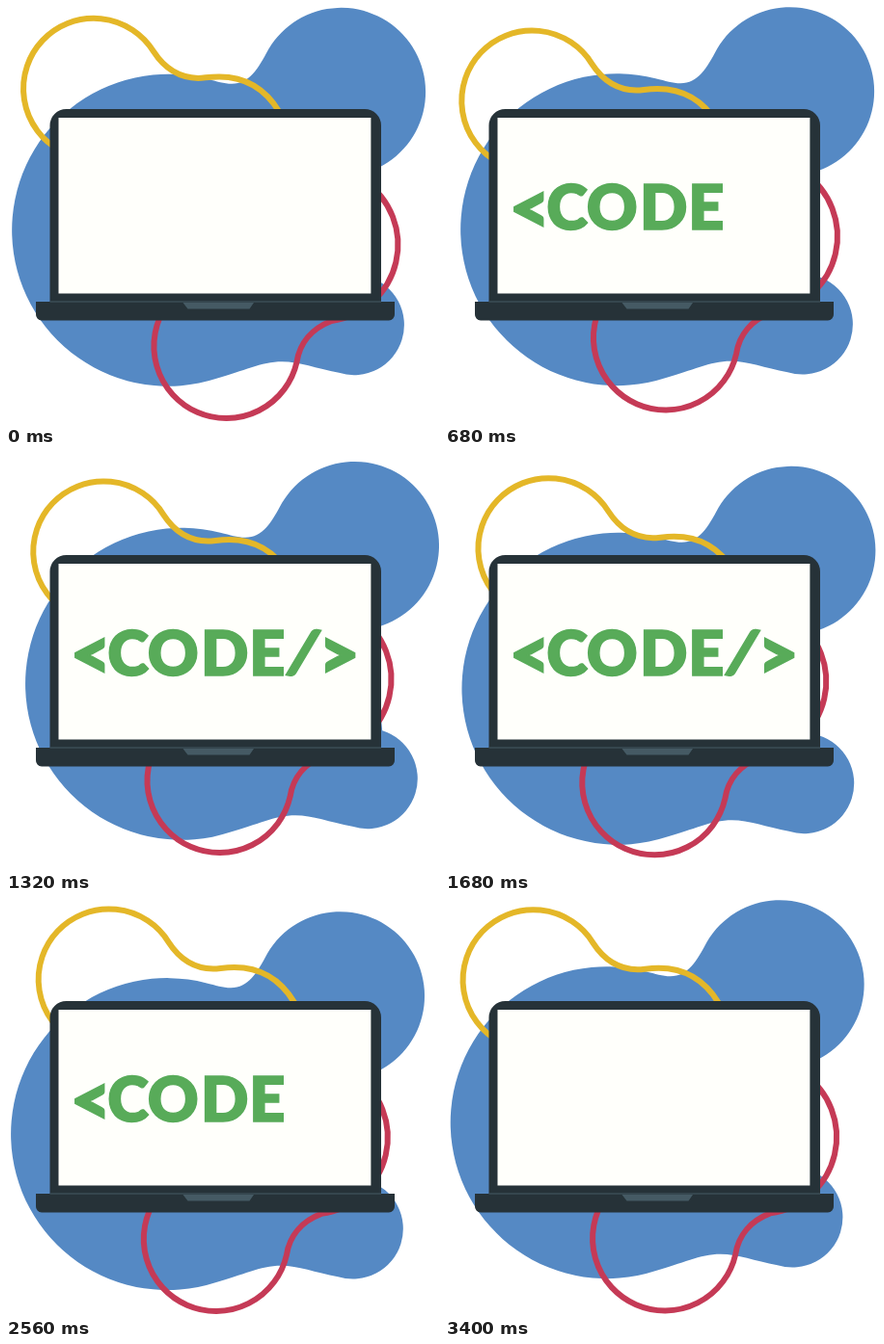
Write an HTML page that moves like this. It is 449 by 434 pixels and loops after 3.44 s.

```html
<!DOCTYPE html>
<html lang="en">
<head>
<meta charset="utf-8">
<title>Code laptop</title>
<style>
  html, body { margin: 0; width: 100%; height: 100%; overflow: hidden; background: #fff; }
  svg { display: block; width: 100%; height: 100%; }
  text { font: 900 65px Lato, sans-serif; fill: #58ab59; stroke: #58ab59; stroke-width: 1.4; }
  .angle { font-size: 74px; }
</style>
</head>
<body>
<svg viewBox="0 0 449 434">
  <path id="blob" fill="#5589c4" d="M217 388.5 A162 162 0 1 1 207 77.5 C218 80 224 82.5 233 82.5 C251 82.5 260 67 271 46.5
    A87.5 87.5 0 1 1 365 176.5 L375 283 A52 52 0 1 1 344 382.5 C320 378 303 371 285 371 C263 371 245 381 217 388.5Z"/>
  <g fill="none" stroke-width="6">
    <path id="gold" stroke="#e4b728" d="M55 148.5 A73 73 0 1 1 152 46 C163 63 177 73 198 73.5
      C205 73.5 208 72 220 72 C247 72 268 85 282 108 L290 124"/>
    <path id="rose" stroke="#c53a56" d="M165 310 A75 75 0 1 0 300 369 C303 349 316 334 336 326.3 A80 80 0 0 0 370 181"/>
  </g>
  <path fill="#263238" d="M45.5 308 V124 A17 17 0 0 1 62.5 107 H372 A17 17 0 0 1 389 124 V308Z"/>
  <path fill="#fffffb" d="M54.5 116 H378.4 V298.5 H54.5Z"/>
  <path fill="#263238" d="M31 307 H403 V320 A6 6 0 0 1 397 326.5 H37 A6 6 0 0 1 31 320Z"/>
  <path fill="#455a64" d="M45.5 306.6 H389 V307.6 H45.5Z M183.5 308 H257 L252.5 314.5 H188.5Z"/>
  <text id="word">
    <tspan x="66.5" y="235.6" class="angle"></tspan>
    <tspan x="105.3" y="231.7"></tspan>
    <tspan x="146.8" y="231.7"></tspan>
    <tspan x="202" y="231.7"></tspan>
    <tspan x="252.3" y="231.7"></tspan>
    <tspan x="289.2" y="228" rotate="10"></tspan>
    <tspan x="324" y="235.6" class="angle"></tspan>
  </text>
</svg>
<script>
  const LOOP = 3440, STEP = 40, KEY = 130;
  const TEXT = '<CODE/>';
  const $ = id => document.getElementById(id);
  const wave = (turn, deg) => Math.cos(turn - deg * Math.PI / 180);

  // Each shape drifts round a small circle: centre, radius, phase of x and of y.
  const orbits = [
    { el: $('blob'), x: 6.7, y: 5, r: 8.6, px: 129, py: 219 },
    { el: $('gold'), x: 9.6, y: 8.3, r: 10.9, px: 219, py: 129 },
    { el: $('rose'), x: -4.2, y: -4, r: 7.4, px: 39, py: -51 }
  ];
  const glyphs = [...$('word').children];
  const keys = (t, from) => Math.max(0, Math.min(TEXT.length, Math.floor((t - from) / KEY) + 1));

  function draw(now) {
    const t = Math.floor(now % LOOP / STEP) * STEP;
    const turn = t / LOOP * 2 * Math.PI;
    for (const o of orbits) {
      const dx = o.x + o.r * wave(turn, o.px), dy = o.y + o.r * wave(turn, o.py);
      o.el.setAttribute('transform', `translate(${dx.toFixed(2)} ${dy.toFixed(2)})`);
    }
    const shown = keys(t, 120) - keys(t, 2400);
    glyphs.forEach((g, i) => g.textContent = i < shown ? TEXT[i] : '');
  }

  let start;
  function tick(now) {
    start ??= now;
    draw(now - start);
    requestAnimationFrame(tick);
  }
  draw(0);
  requestAnimationFrame(tick);
</script>
</body>
</html>
```
